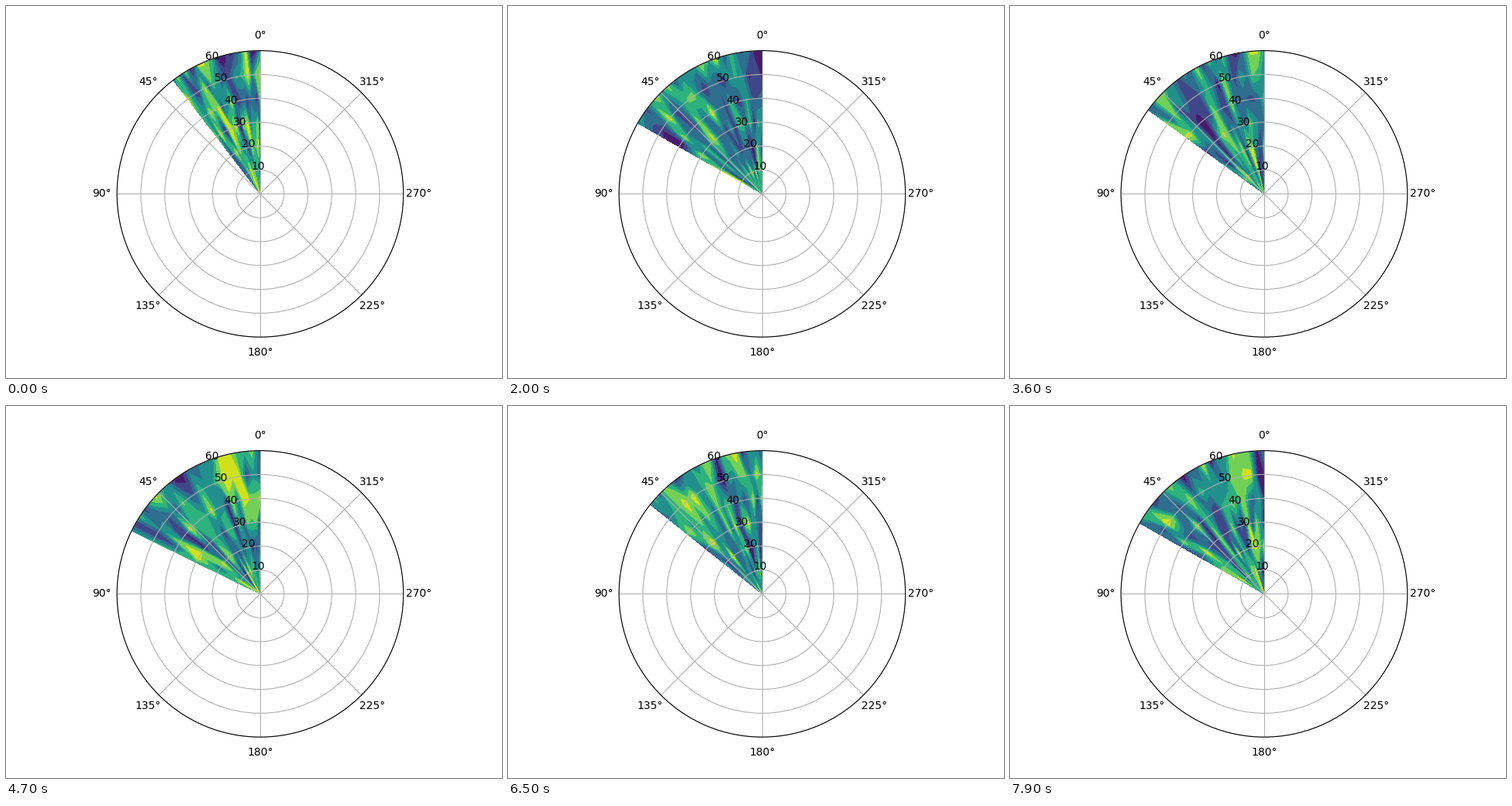
These frames come from a looping animation (640x480 px, 8 s). A matplotlib script:

```python
import numpy as np
import matplotlib.pyplot as plt
from matplotlib.animation import FuncAnimation

STEPS, INTERVAL = 80, 100
COLS = 20
radii = np.arange(0, 61, 10)
levels = np.arange(0, 1.06, 0.15)

# Turning points of the sector's opening angle: (step, degrees)
sweep = [(0, 37.4), (8, 49), (15, 61), (20, 60.4), (27, 54.6),
         (36, 54.1), (47, 63.9), (52, 67.6), (65, 51.4), (79, 60.4)]

fig, ax = plt.subplots(figsize=(6.4, 4.8), dpi=100,
                       subplot_kw={"projection": "polar"})
ax.set_theta_zero_location("N")
ax.set_ylim(0, 60)
ax.set_yticks(radii[1:])
ax.autoscale(False)

contour = None


def draw(step):
    """Fill the sector with fresh noise, seeded by the step."""
    global contour
    if contour is not None:
        contour.remove()
    end = np.radians(np.interp(step, *zip(*sweep)))
    r, theta = np.meshgrid(radii, np.linspace(0, end, COLS))
    values = np.random.default_rng(step).random(r.shape)
    contour = ax.contourf(theta, r, values, levels=levels)
    return [contour]


anim = FuncAnimation(fig, draw, frames=STEPS, interval=INTERVAL,
                     init_func=lambda: [], repeat=True, repeat_delay=0)
plt.show()
```
